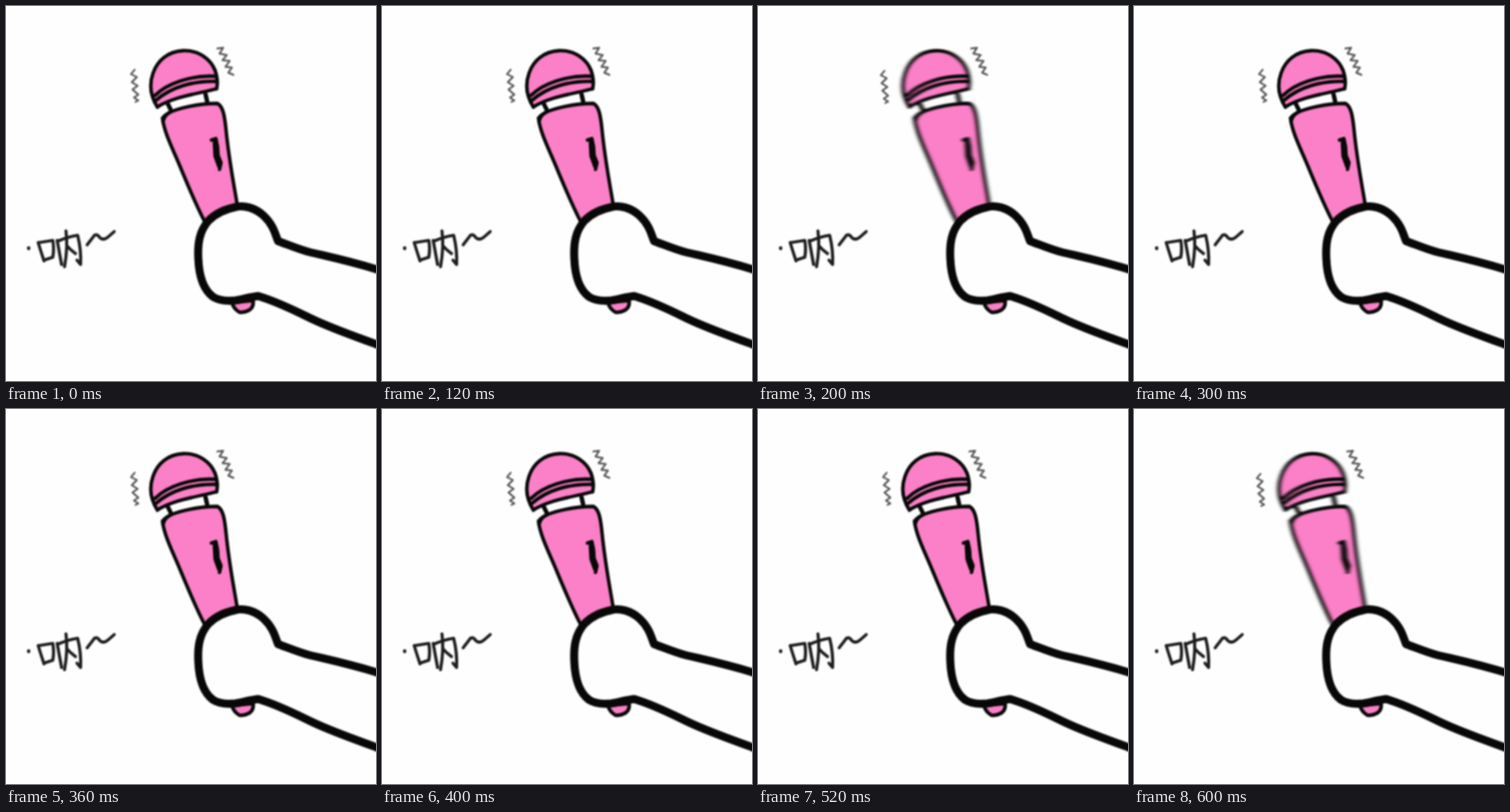
These frames come from a looping animation (506 by 512 pixels, 700 ms). An HTML page:

```html
<!DOCTYPE html>
<html lang="zh">
<head>
<meta charset="utf-8">
<style>
html, body { margin: 0; width: 100%; height: 100%; overflow: hidden; background: #fefefe; }
svg { display: block; width: 100vw; height: 100vh; }
path { fill: none; stroke: #080808; stroke-linecap: round; stroke-linejoin: round; }
.soft { filter: blur(0.8px); }
.pink path { fill: #fb80c7; stroke: none; }
.line path { stroke-width: 4.8; }
.shake path { stroke: #555; stroke-width: 2.5; }
.word path { stroke: #1c1c1c; stroke-width: 4.2; }
</style>
</head>
<body>
<svg viewBox="0 0 506 512" preserveAspectRatio="none">
  <defs>
    <filter id="smear" x="-20%" y="-10%" width="140%" height="120%" color-interpolation-filters="sRGB">
      <feGaussianBlur stdDeviation="2.8 0.5"/>
    </filter>
  </defs>

  <g class="soft">
    <g class="pink">
      <path d="M206 137C197 122 196 106 201 92C207 74 222 62 242 61C264 60 280 73 286 88C289 97 290 105 288 113C262 119 232 123 206 137Z"/>
      <path d="M214 153C222 141 262 133 289 133C297 137 299 150 301 170C305 210 311 240 316 270L272 294C260 272 250 248 238 219C228 195 216 172 214 153Z"/>
    </g>
    <g id="outline" class="line">
      <path d="M207 138C197 122 196 106 201 92C207 74 222 62 242 61C264 60 280 73 286 88C289 97 290 105 288 113"/>
      <path d="M204 122C220 106 253 94 287 96M205 129C225 111 255 102 288 103M207 138C228 124 262 120 288 113"/>
      <path d="M221 133L225 141M273 121L275 130" style="stroke-width:6"/>
      <path d="M214 153C222 141 262 133 289 133C297 137 299 150 301 170C305 210 311 240 316 270M214 153C216 172 228 195 238 219C250 248 260 272 271 293"/>
      <path d="M215 157Q217 148 226 144"/>
      <path d="M281 183L287 181Q290 192 290 204L294 214L292 223M285 186L286 205L291 219"/>
    </g>

    <g class="shake">
      <path id="left" d="M176 87L171 93L179 97L172 104L180 109L173 114L181 121L175 125L181 129L177 131"/>
      <path id="right" d="M289 58L297 57L292 65L302 67L296 74L306 75L300 83L309 84L304 91L311 94"/>
    </g>

    <path d="M309 405Q311 413 319 418Q326 419 333 415Q339 411 338 402Z" style="fill:#fb80c7;stroke-width:5"/>
    <path d="M515 362C470 348 440 342 415 336C400 332 386 326 372 321C368 311 366 299 352 286C340 275 325 272 316 274C300 277 286 284 277 293C264 308 262 325 263 345C264 370 271 388 283 397C292 403 303 403 314 402C326 400 334 397 345 396C372 404 395 416 420 428C450 442 480 452 515 465" style="fill:#fefefe;stroke-width:11"/>

    <g class="word">
      <path d="M31 330.5V331" style="stroke-width:4.8"/>
      <path d="M44 323Q48 336 52 348M45 323L64 320Q66 332 64 343L52 347"/>
      <path d="M70 320L76 353M71 321Q85 315 98 313Q103 333 102 353L97 347M82 307Q85 329 80 356M83 327Q88 333 95 338"/>
      <path d="M111 326L121 313Q125 311 128 316Q133 321 140 315L148 308"/>
    </g>
  </g>
</svg>
<script>
const [outline, left, right] = ['outline', 'left', 'right'].map(id => document.getElementById(id));
let last;

function draw(now) {
  const t = now % 700;
  const shaking = (t >= 200 && t < 300) || t >= 600;
  if (shaking !== last) {
    last = shaking;
    outline.setAttribute('filter', shaking ? 'url(#smear)' : 'none');
    left.setAttribute('transform', shaking ? 'translate(-3 1.5)' : '');
    right.setAttribute('transform', shaking ? 'translate(2.5 0)' : '');
  }
}

const start = performance.now();
function tick() {
  draw(performance.now() - start);
  requestAnimationFrame(tick);
}
tick();
</script>
</body>
</html>
```
